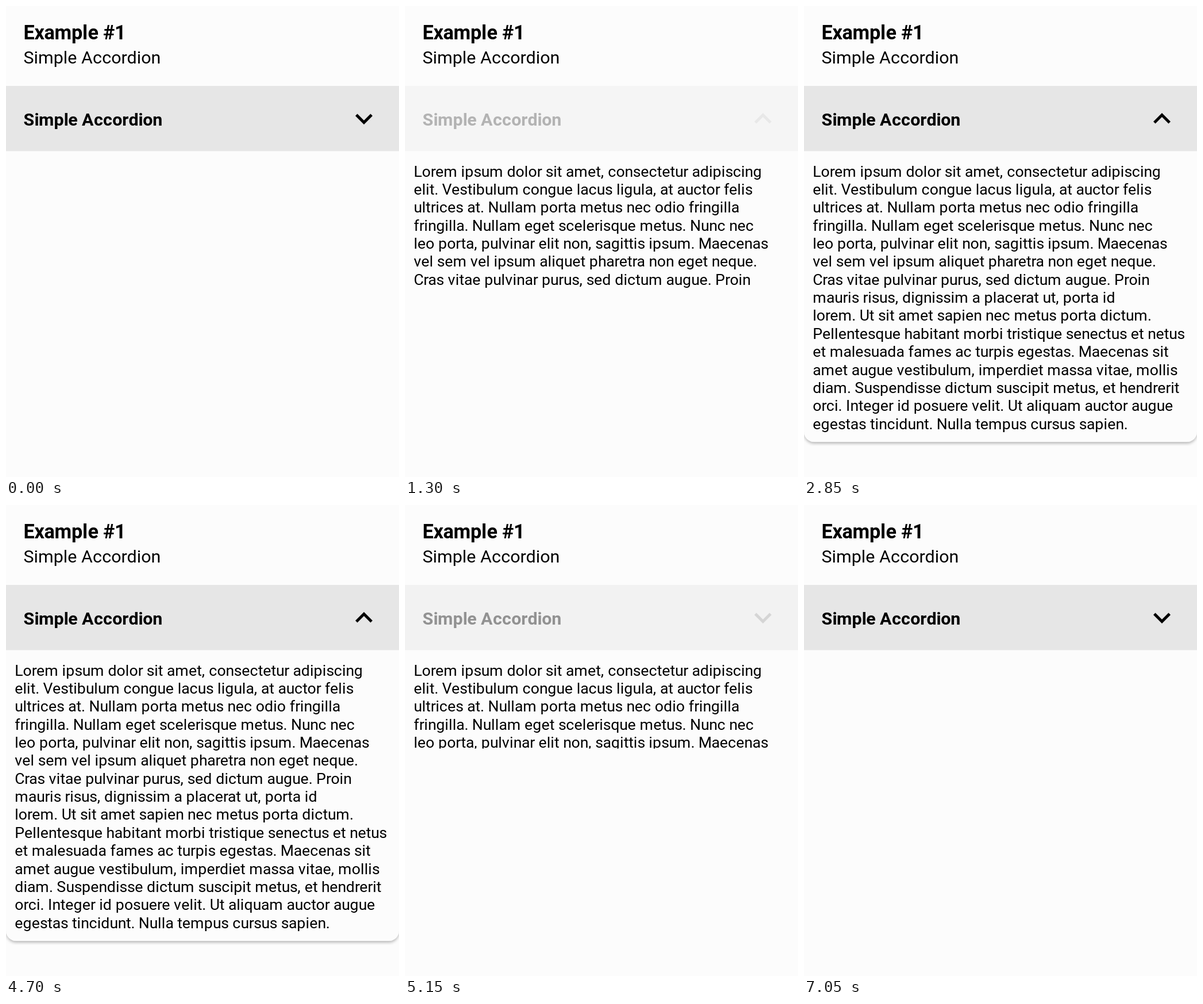
Recreate the animation shown at these times as an HTML page. Size 684 by 819 pixels, loop 7150 ms.

```html
<!DOCTYPE html>
<html lang="en">
<head>
<meta charset="utf-8">
<title>Simple Accordion</title>
<style>
  html, body { margin: 0; width: 100%; height: 100%; overflow: hidden; background: #fcfcfc; }
  svg { display: block; width: 100%; height: 100%; font-family: Roboto, sans-serif; }
</style>
</head>
<body>
<svg viewBox="0 0 684 819">
  <defs>
    <clipPath id="clip"><rect id="window" y="252.4" width="684" height="0"/></clipPath>
    <filter id="shadow" x="-5%" y="-5%" width="110%" height="110%">
      <feDropShadow dx="0" dy="3" stdDeviation="2.8" flood-color="#000" flood-opacity=".26"/>
    </filter>
  </defs>
  <rect width="684" height="819" fill="#fcfcfc"/>
  <g id="heading"></g>
  <g clip-path="url(#clip)">
    <rect y="220" width="684" height="538" rx="18" fill="#fcfcfc" filter="url(#shadow)"/>
    <g id="body"></g>
  </g>
  <g id="header">
    <rect y="139" width="684" height="113.4" fill="#e6e6e6"/>
    <path id="chevron" transform="translate(593 166) scale(2.5)"/>
  </g>
</svg>
<script>
const LOOP = 7150, TICK = 50;
const FULL = 513, SLIDE = 300, FADE = 250;
const SCALE = .95; // stage pixels per device pixel
const OPEN = { press: 1100, release: 1242 };
const CLOSE = { press: 4950, release: 5058 };
const DOWN = 'M7.41 8.59 12 13.17l4.59-4.58L18 10l-6 6-6-6z';
const UP = 'M7.41 15.41 12 10.83l4.59 4.58L18 14l-6-6-6 6z';

const lines = [
  'Lorem ipsum dolor sit amet, consectetur adipiscing',
  'elit. Vestibulum congue lacus ligula, at auctor felis',
  'ultrices at. Nullam porta metus nec odio fringilla',
  'fringilla. Nullam eget scelerisque metus. Nunc nec',
  'leo porta, pulvinar elit non, sagittis ipsum. Maecenas',
  'vel sem vel ipsum aliquet pharetra non eget neque.',
  'Cras vitae pulvinar purus, sed dictum augue. Proin',
  'mauris risus, dignissim a placerat ut, porta id',
  'lorem. Ut sit amet sapien nec metus porta dictum.',
  'Pellentesque habitant morbi tristique senectus et netus',
  'et malesuada fames ac turpis egestas. Maecenas sit',
  'amet augue vestibulum, imperdiet massa vitae, mollis',
  'diam. Suspendisse dictum suscipit metus, et hendrerit',
  'orci. Integer id posuere velit. Ut aliquam auctor augue',
  'egestas tincidunt. Nulla tempus cursus sapien.'
];

const $ = id => document.getElementById(id);
const clamp = x => Math.min(1, Math.max(0, x));
const outCubic = x => 1 - (1 - x) ** 3;
const inOutQuad = x => x < .5 ? 2 * x * x : 1 - 2 * (1 - x) ** 2;
const ctx = document.createElement('canvas').getContext('2d');

// Glyph advances snap to whole device pixels, as on a hinted screen.
function glyphOffsets(string, size, weight) {
  const zoom = 10; // measure large to get unhinted widths
  ctx.font = `${weight} ${size * zoom}px Roboto, sans-serif`;
  const width = s => ctx.measureText(s).width / zoom;
  let x = 0;
  return [...string].map((char, i) => {
    const offset = x, next = string[i + 1] || '';
    const kern = width(char + next) - width(char) - width(next);
    x += Math.round(width(char)) + kern;
    return offset;
  });
}

function addText(parent, string, x, y, size, weight = 400) {
  const text = document.createElementNS('http://www.w3.org/2000/svg', 'text');
  text.setAttribute('transform', `translate(${x} ${y}) scale(${SCALE})`);
  text.setAttribute('x', glyphOffsets(string, size, weight).join(' '));
  text.setAttribute('font-size', size);
  text.setAttribute('font-weight', weight);
  text.textContent = string;
  $(parent).append(text);
}

addText('heading', 'Example #1', 30.4, 58.2, 36, 700);
addText('heading', 'Simple Accordion', 30.4, 100, 32);
addText('header', 'Simple Accordion', 30.4, 208, 32, 700);
lines.forEach((line, i) => addText('body', line, 15.2, 296.6 + i * 31.36, 28));

// A press dims the header at once; the release brings it back.
function dim(t, { press, release }) {
  if (t < press) return 1;
  return .2 + .8 * inOutQuad(clamp((t - release) / FADE));
}

function render(t) {
  const opening = clamp((t - OPEN.release) / SLIDE);
  const closing = clamp((t - CLOSE.release) / SLIDE);
  const isOpen = t >= OPEN.release && t < CLOSE.release;
  const fade = t < OPEN.release ? 1 : isOpen ? opening : closing;

  $('window').setAttribute('height', FULL * (outCubic(opening) - outCubic(closing)));
  $('header').setAttribute('opacity', dim(t, OPEN) * dim(t, CLOSE));
  $('chevron').setAttribute('d', isOpen ? UP : DOWN);
  $('chevron').setAttribute('opacity', fade);
}

const start = performance.now();
function loop() {
  const t = (performance.now() - start) % LOOP;
  render(Math.floor(t / TICK) * TICK);
  requestAnimationFrame(loop);
}
loop();
</script>
</body>
</html>
```
